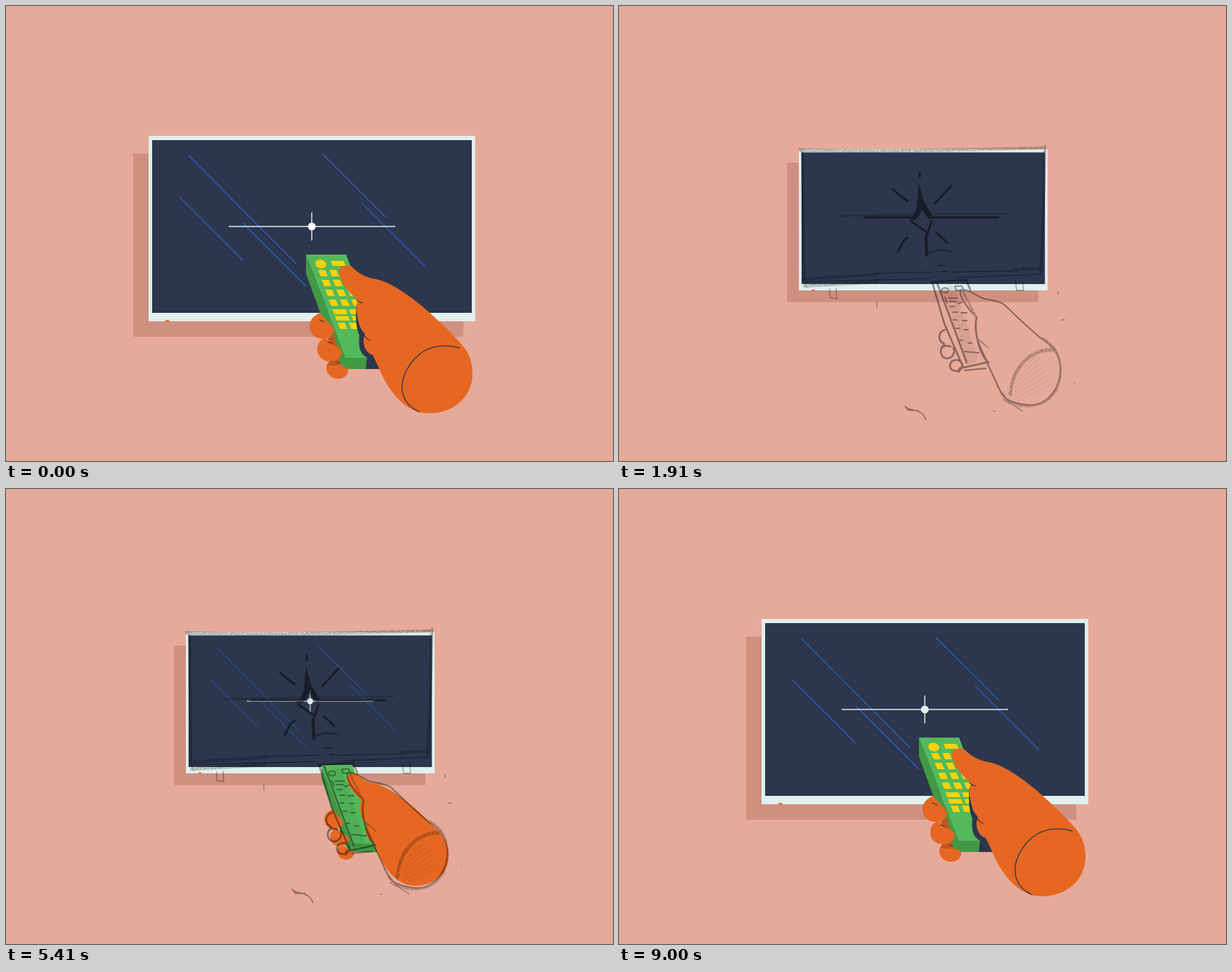
An HTML page for the animation above (9.08 s loop, 864x648 px).

```html
<!DOCTYPE html>
<html lang="en">
<head>
<meta charset="utf-8">
<title>Remote</title>
<style>
html, body { margin: 0; width: 100%; height: 100%; overflow: hidden; background: #fff; }
svg { display: block; width: 100%; height: 100%; }
#sketch { mix-blend-mode: multiply; fill: none; stroke: #999; stroke-linecap: round; stroke-linejoin: round; }
.thin { stroke: #a6a6a6; stroke-width: 1.3; }
.mid { stroke-width: 2; filter: url(#smooth); }
.bold { stroke: #858585; stroke-width: 3.2; filter: url(#smooth); }
.soft { stroke: #b4b4b4; stroke-width: 4.5; filter: url(#grain); }
.ink { fill: none; stroke: #2c374d; stroke-width: 1.3; stroke-linecap: round; }
</style>
</head>
<body>
<svg viewBox="0 0 864 648">
  <defs>
    <filter id="grain" filterUnits="userSpaceOnUse" x="230" y="180" width="420" height="410">
      <feTurbulence type="fractalNoise" baseFrequency=".5" numOctaves="2" seed="4"/>
      <feColorMatrix values="0 0 0 0 0  0 0 0 0 0  0 0 0 0 0  0 0 0 2.4 -.5"/>
      <feComposite in="SourceGraphic" operator="in"/>
      <feGaussianBlur stdDeviation=".6"/>
    </filter>
    <filter id="smooth" filterUnits="userSpaceOnUse" x="230" y="180" width="420" height="410">
      <feGaussianBlur stdDeviation=".5"/>
    </filter>
  </defs>
  <rect id="wall" width="864" height="648" fill="#e6aa9a"/>

  <g id="tv">
    <path id="shadow" d="M181 210H651V471H181Z" fill="#d09080"/>
    <g id="frame">
      <path d="M203 185H668V449H203Z" fill="#e0f0ed"/>
      <path d="M227 447.3h5.5v2h-5.5z" fill="#e0622a"/>
    </g>
    <path id="screen" d="M208 191H663V437H208Z" fill="#2c374d"/>
    <path id="glare" d="M260 213L414 368M247 272l90 90M337 309l90 90M451 211l90 90M507 281l90 90"
      stroke="#2f60d0" stroke-width="1.2"/>
    <g id="spark">
      <path d="M317 314H554M435.3 294V334" stroke="#e0f0ed" stroke-width="1.4"/>
      <circle id="dot" cx="435.3" cy="314" r="5.5"/>
    </g>
  </g>

  <g id="hand" fill="#e56722">
    <g id="remote">
      <path d="M427 354V381L473 508Q478 517 486 517H531L541 501H484Z" fill="#419944"/>
      <path d="M427 354H484L541 501H484Z" fill="#54b95b"/>
    </g>
    <path id="buttons" fill="#fbd20b"/>
    <path id="palmShade" fill="#2c374d"
      d="M499 424Q496 455 503 469C501 488 505 496 514 501L512 517H532L522 490 512 440Z"/>
    <g id="fingers">
      <path d="M447 437C437 441 431 449 432 457C433 469 443 474 450 474C459 474 467 468 467 463C467 456 455 447 447 437Z"/>
      <path d="M455 473C447 475 443 481 443 489C443 500 452 506 461 506C470 506 478 500 478 493C478 486 464 482 455 473Z"/>
      <path d="M460 507C455 510 455 518 458 523C462 529 467 531 473 531C482 531 488 524 487 518C486 513 476 514 470 506Z"/>
    </g>
    <g id="fingerDetail">
      <path d="M457 473Q463 472 466 467L472 486Q462 482 457 473ZM460 506Q470 505 474 502L476 510Q468 514 458 511Z" fill="#c5541d"/>
      <path class="ink" d="M446 447l7 3M458 478l6 3M471 507l4 2"/>
    </g>
    <path id="arm" d="M474 379C473 371 484 367 492 371C500 380 512 387 527 389C560 396 610 440 645 478C660 493 664 508 664 524C664 556 638 580 602 580C566 580 543 545 531 516L522 497C514 495 508 486 509 473L511 467C502 458 499 445 499 435Q498 425 501 420C489 407 476 396 474 379Z"/>
    <path id="armLines" class="ink" d="M499 419Q503 422 507 423M499 439C502 459 508 472 518 476M645 487C620 480 597 485 581 503C563 524 561 543 566 556Q572 571 588 578"/>
  </g>

  <g id="sketch">
    <path class="soft" d="M257 205C350 208 450 206 606 202M261 204Q262 300 263 389M606 201Q605 290 600 380M262 389L368 382M264 399L368 393M563 375L602 374"/>
    <path class="thin" d="M256 203l6 4M260 204L264 392 267 401M607 198L605 290 601 382M362 381L445 379M472 379L568 377M264 393L440 388M480 387L601 382M300 403V415L310 417 309 402M564 390L566 405H576L574 390M367 421v8"/>
    <path class="soft" style="stroke-width:2.5" d="M310 299L420 297M446 296H553"/>
    <path class="bold" d="M349 301H414M446 301H540M428 237V244M390 261Q400 271 411 278M473 256L450 281M411 330L406 333 397 350M453 324L467 337"/>
    <path class="bold" d="M416 307L438 322M445 307L437 330"/>
    <path class="bold" style="stroke-width:4.5" d="M437 329L438 355"/>
    <path class="bold" style="stroke-width:1.5;fill:#858585" d="M427.5 255Q430 278 447 301L443 303Q436 299 431 288Q427 300 421 304L414 304Q425 294 425 280Z"/>
    <path class="mid" d="M438 353Q456 344 473 350M454 370q4-2 9 0M459 378h8"/>
    <path class="soft" style="stroke-width:20;opacity:.3" d="M470 408L500 500"/>
    <path class="mid" style="stroke-width:2.6" d="M445 393L494 390 500 404M446 394L463 452 490 515 526 507M453 395L495 508"/>
    <path class="mid" d="M509 443C503 465 514 487 525 508M492 519L522 516"/>
    <path class="mid" d="M459 405a5 3.5 0 1 0 10 0a5 3.5 0 1 0-10 0M478 399h10l3 6h-11zM464 415l3 8M469 416h12M470 421h10M471 428h7M482 424l6-2M475 436h7M487 437h8M476 447h5M489 448h6M480 459h5M491 461h6M484 476h5M497 480h5M492 492l20 2"/>
    <path class="mid" d="M486 404C497 402 510 414 520 417C529 419 541 420 548 425C562 438 584 460 603 475C622 487 630 503 628 524C624 553 604 571 580 568C563 566 549 562 544 551L523 506C511 490 506 465 509 443C500 435 483 415 486 404"/>
    <path class="soft" style="stroke-width:3" d="M603 473C630 488 635 520 622 548C609 570 577 578 548 561M489 405L508 443"/>
    <path class="thin" d="M538 541L556 565 574 577M512 475l14 12"/>
    <path class="soft" style="stroke-width:5" d="M620 490C588 487 560 512 557 553"/>
    <path id="hatch" class="thin" stroke-opacity=".2"/>
    <path class="mid" style="stroke-width:2.6" d="M464 461c-10 3-11 16-1 20M463 482c-8 7-6 18 3 20c9 0 13-8 10-15M458 491q2-10 14-6M471 512a9 8 0 1 0 18 0a9 8 0 1 0-18 0M486 515q-4 4-2 6"/>
    <path class="mid" style="stroke-width:1.5" d="M407 570C412 578 430 571 437 589M407 570L412 576 426 576"/>
    <path class="thin" d="M573 286h.5M392 311h.5M625 407v4M630 447h4M648 537h.5M533 577h2"/>
  </g>
</svg>
<script>
const LOOP = 9080, CLEAN = 7490;
const byId = id => document.getElementById(id);

// When each layer of the drawing comes in; all stay until the loop restarts.
const appears = {
  wall: 660, shadow: 1000, frame: 1250, screen: 1660, glare: 2080, spark: 2500,
  arm: 2990, remote: 3910, fingers: 4830, buttons: 5660, palmShade: 6160,
  fingerDetail: 6580, armLines: 6990
};

const key = (x, y, w, h) => `M${x} ${y}h${w}l${h * .42} ${h}h${-w}z`;
let keys = 'M440.6 365a7.6 5.8 15 1 0 14.8 5a7.6 5.8 15 1 0-14.8-5z' + key(462, 363, 18.5, 7);
for (let row = 0; row < 4; row++)
  for (let col = 0; col < 3; col++)
    keys += key(444.3 + row * 5 + col * 16, 376 + row * 14, 10, 9);
keys += key(464.5, 432, 19, 7) + key(488, 432, 10, 7)
  + key(468, 441.5, 19, 6.5) + key(491.5, 441.5, 10, 6.5)
  + key(472, 451, 10, 9) + key(488, 451, 10, 9);
byId('buttons').setAttribute('d', keys);

let hatch = '';
for (let i = 0; i < 8; i++) hatch += `M${560 + i} ${528 + i * 5}L${596 + i * 3} ${496 + i * 6}`;
byId('hatch').setAttribute('d', hatch);

function place(id, clean, x, y) {
  byId(id).setAttribute('transform', clean ? '' : `translate(${x} ${y}) scale(.7613)`);
}

function draw(now) {
  const t = now % LOOP;
  const opening = t < 80;
  const clean = opening || t >= CLEAN;
  for (const id in appears)
    byId(id).style.display = clean || t >= appears[id] ? '' : 'none';
  byId('sketch').style.display = clean ? 'none' : '';
  byId('dot').setAttribute('fill', opening ? '#fff' : '#e0f0ed');
  place('tv', clean, 101.5, 63.2);
  place('hand', clean, 124.3, 123.6);
}

const start = performance.now();
function tick() {
  draw(performance.now() - start);
  requestAnimationFrame(tick);
}
tick();
</script>
</body>
</html>
```
